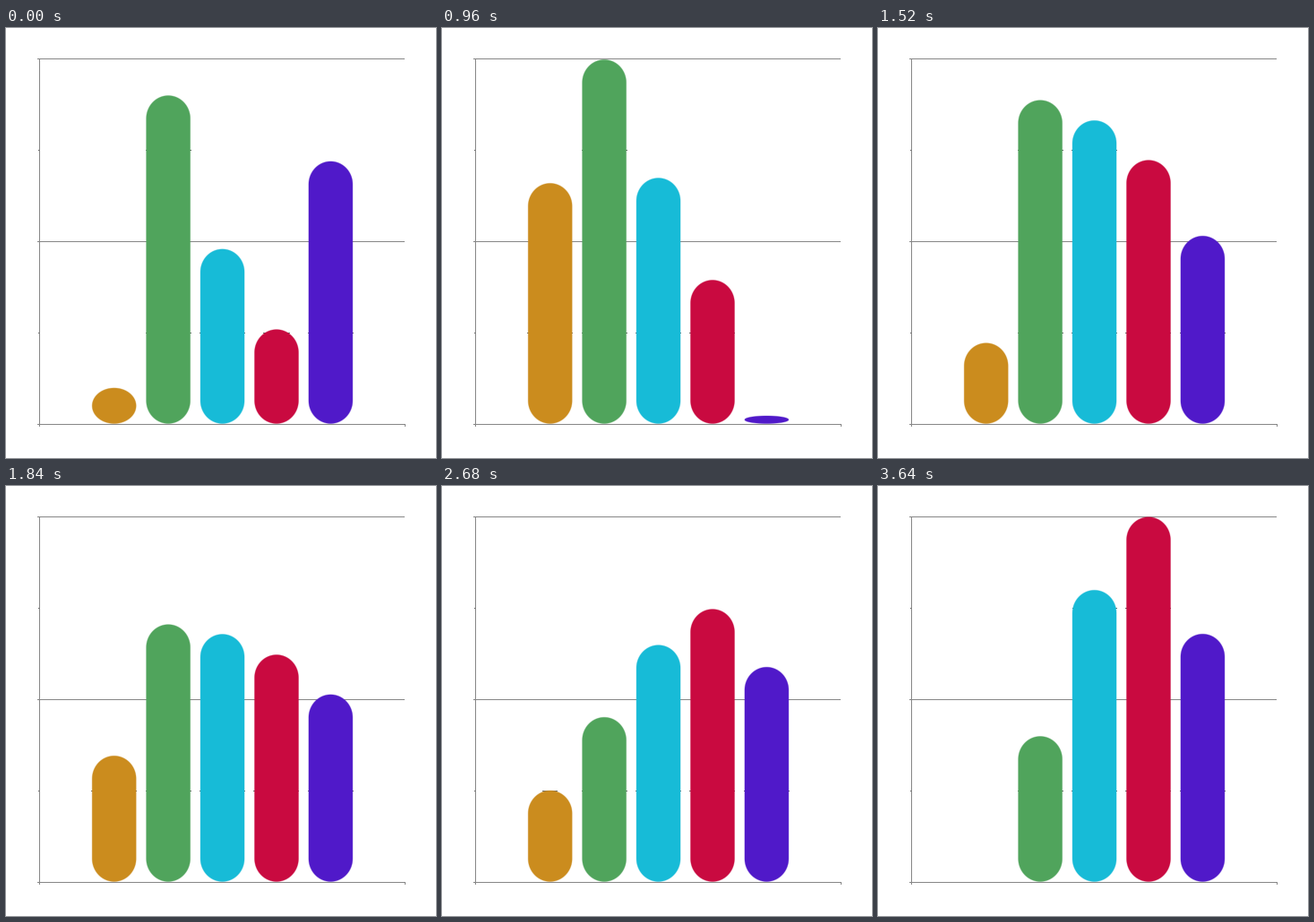
Animation of 480 by 480 pixels, one loop 5.52 s. Source, as a matplotlib script:

```python
import matplotlib.pyplot as plt
import numpy as np
from matplotlib.animation import FuncAnimation
from matplotlib.colors import to_rgba
from matplotlib.patches import Polygon, Rectangle

SIZE, DPI = 480, 100
STEP, LOOP = 40, 5520            # ms
START, DURATION = 445, 3175      # ms
PX = 72 / DPI                    # one pixel in points

BASE, UNIT = 442.7, 4.08         # baseline and pixels per value
BOTTOM = 441.5                   # lower end of the bars
RX, RY, RIM = 24.5, 25.5, 1.0    # bar half width, cap height, rim beside bars
CENTERS = 120.7 + 60.43 * np.arange(5)
COLORS = ["#cb8c1e", "#50a45c", "#17bbd7", "#c90a40", "#5019c9"]
MAJOR_ROWS = (34, 238, 442)
MINOR_ROWS = (136, 340)
GREY, DARK = "#868686", "#666666"

# Bar values at equal steps of the eased progress
STAGES = np.array([
    [10, 90, 48, 26, 72],
    [66.7, 100, 67.2, 39, 1.6],
    [21.4, 88.5, 83.5, 73, 52.6],
    [49.7, 50.3, 50.3, 50.2, 50.1],
    [0, 40, 80, 100, 68],
])

# Ease-out as the cubic Bezier (0, 0), (0.58, 1)
s = np.linspace(0, 1, 2001)
EASE_X = 3 * 0.58 * (1 - s) * s**2 + s**3
EASE_Y = 3 * (1 - s) * s**2 + s**3


def values_at(ms):
    u = np.clip((ms - START) / DURATION, 0, 1)
    progress = np.interp(u, EASE_X, EASE_Y) * (len(STAGES) - 1)
    k = min(int(progress), len(STAGES) - 2)
    return STAGES[k] + (STAGES[k + 1] - STAGES[k]) * (progress - k)


def bar_outline(cx, top):
    ry = min(RY, (BOTTOM - top) / 2)
    a = np.linspace(0, np.pi, 49)
    x = RX * np.cos(a)
    cap = np.column_stack([cx + x, top + ry - ry * np.sin(a)])
    foot = np.column_stack([cx - x, BOTTOM - ry + ry * np.sin(a)])
    return np.vstack([cap, foot])


def rim_half_width(row, top):
    """Half width of the bar grown by the rim, at a given pixel row."""
    depth = max(row + 0.5 - (top - RIM), 0)
    k = min(depth / (RY + RIM), 1)
    return (RX + RIM) * np.sqrt(1 - (1 - k) ** 2)


fig = plt.figure(figsize=(SIZE / DPI, SIZE / DPI), dpi=DPI, facecolor="white")
ax = fig.add_axes([0, 0, 1, 1])
ax.set_xlim(0, SIZE)
ax.set_ylim(SIZE, 0)
ax.axis("off")


def rule(x, y, w, h, color=GREY, z=1):
    return ax.add_patch(Rectangle((x, y), w, h, fc=color, ec="none", lw=0, zorder=z))


for row in MAJOR_ROWS:
    rule(35, row, 410, 1)
for row in MINOR_ROWS:
    rule(36, row, 1, 1, DARK)
rule(37, 34, 1, 411)
rule(445, 442, 1, 3)

bars, rims = [], []
for color in COLORS:
    bar = Polygon([[0, 0], [0, 1], [1, 1]], closed=True, fc=color,
                  ec=to_rgba(color, 0.35), lw=PX, zorder=3)
    bars.append(ax.add_patch(bar))
    rims.append([rule(0, row, 0, 1, DARK, 2) for row in MINOR_ROWS])


def draw(i):
    for cx, value, bar, marks in zip(CENTERS, values_at(i * STEP), bars, rims):
        top = BASE - UNIT * value
        bar.set_visible(top < BOTTOM)
        if top < BOTTOM:
            bar.set_xy(bar_outline(cx, top))
        for row, mark in zip(MINOR_ROWS, marks):
            w = rim_half_width(row, top)
            mark.set_visible(w > 0)
            mark.set_bounds(cx - w, row, 2 * w, 1)
    return bars + [m for pair in rims for m in pair]


anim = FuncAnimation(fig, draw, frames=LOOP // STEP, interval=STEP,
                     repeat=True, repeat_delay=0, blit=False)
plt.show()
```
